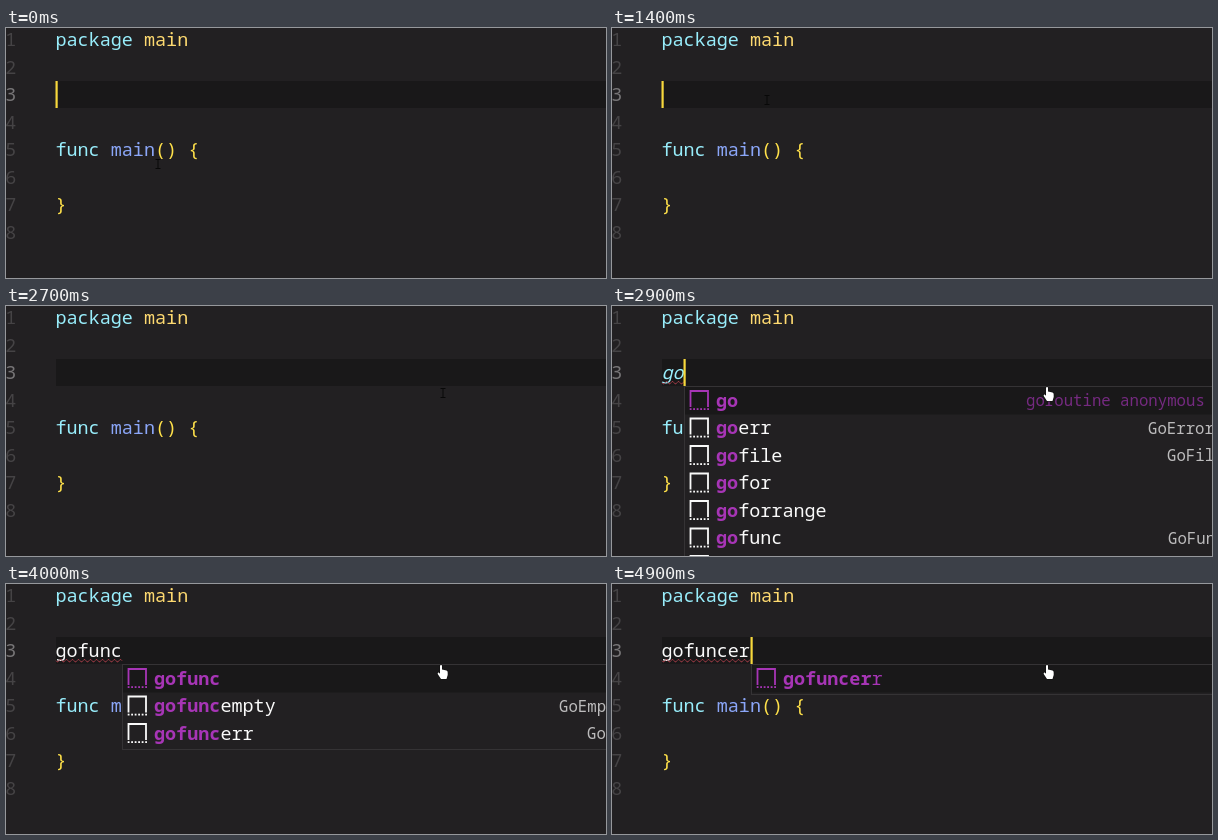
An HTML page with a canvas for the animation above (5000 ms loop, 600 by 250 pixels).

```html
<!DOCTYPE html>
<html lang="en">
<head>
<meta charset="utf-8">
<title>Snippet completion</title>
<style>
  html, body { margin: 0; width: 600px; height: 250px; overflow: hidden; background: #222022; }
  canvas { display: block; }
</style>
</head>
<body>
<canvas id="stage" width="600" height="250"></canvas>
<script>
const ctx = document.getElementById('stage').getContext('2d');
const LOOP = 5000, STEP = 100, BLINK = 525;
const CHAR = 11.07, LINE = 27.5, LEFT = 50, BASE = 18;
const FAMILY = '"Noto Sans Mono", "DejaVu Sans Mono", monospace';
const CYAN = '#98edfb', YELLOW = '#ffe14a', PURPLE = '#a735b6', WHITE = '#fafafa';

// label, detail, detail offset from the popup's left edge
const items = [
  ['go', 'goroutine anonymous function', 342],
  ['goerr', 'GoError', 464],
  ['gofile', 'GoFile', 483],
  ['gofor', '', 0],
  ['goforrange', '', 0],
  ['gofunc', 'GoFunc', 484],
  ['gofuncempty', 'GoEmptyFunc', 437],
  ['gofuncerr', 'GoFuncErr', 465]
];
const typed = 'gofuncer';
const keyTimes = [2800, 2900, 3000, 3100, 3200, 3400, 4300, 4700];

function text(str, x, y, color, style = '500', size = 18.45) {
  ctx.font = `${style} ${size}px ${FAMILY}`;
  ctx.fillStyle = color;
  ctx.fillText(str, x, y);
}

function rect(x, y, w, h, color) {
  ctx.fillStyle = color;
  ctx.fillRect(x, y, w, h);
}

const baseline = line => BASE + (line - 1) * LINE;
const caretX = count => Math.round(LEFT + count * CHAR);

function code(line, col, str, color, style) {
  text(str, LEFT - 0.6 + col * CHAR, baseline(line), color, style);
}

function drawEditor(word) {
  rect(0, 0, 600, 250, '#222022');
  rect(LEFT, 53, 550, 27, '#191819');
  for (let n = 1; n <= 8; n++) text(n, -0.8, baseline(n), n === 3 ? '#777577' : '#454345', '400');
  code(1, 0, 'package', CYAN);
  code(1, 8, 'main', '#fdd970');
  code(5, 0, 'func', CYAN);
  code(5, 5, 'main', '#8ba6f8');
  code(5, 9, '() {', YELLOW);
  code(7, 0, '}', YELLOW);
  if (word === 'go') code(3, 0, word, CYAN, 'italic 500');
  else code(3, 0, word, WHITE);
}

function drawSquiggle(width) {
  ctx.beginPath();
  for (let x = 0; x <= width; x++) ctx.lineTo(LEFT + x, 76.7 + 1.3 * Math.sin(x * Math.PI / 3));
  ctx.strokeStyle = '#a03c47';
  ctx.lineWidth = 1;
  ctx.stroke();
}

function drawIcon(x, y, color) {
  ctx.strokeStyle = color;
  ctx.lineWidth = 1.8;
  ctx.beginPath();
  ctx.moveTo(x, y + 16);
  ctx.lineTo(x, y);
  ctx.lineTo(x + 17.5, y);
  ctx.lineTo(x + 17.5, y + 16);
  ctx.stroke();
  for (let i = 0; i < 6; i++) rect(x - 0.8 + i * 3.5, y + 17.2, 1.8, 1.8, color);
}

function drawPopup(word) {
  const x = caretX(word.length);
  const rows = items.filter(([label]) => label.startsWith(word));
  const height = rows.length * 27.6 + 2.5;
  rect(x, 80, 600, height, '#222022');
  rect(x, 80, 600, LINE + 1, '#191819');
  ctx.strokeStyle = '#353335';
  ctx.lineWidth = 1;
  ctx.strokeRect(x + 0.5, 80.5, 600, Math.round(height));
  rows.forEach(([label, detail, offset], i) => {
    const y = baseline(4 + i), color = i ? WHITE : PURPLE;
    drawIcon(x + 6.5, y - 15.5, color);
    text(word, x + 32, y, PURPLE, 'bold');
    text(label.slice(word.length), x + 32 + word.length * CHAR, y, color);
    text(detail, x + offset, y - 0.5, i ? '#bcbbbc' : '#752a80', '400', 15.7);
  });
}

function drawBeam(x, y) {
  rect(x - 0.5, y - 4, 1, 9, '#080808');
  rect(x - 2.5, y - 5, 5, 1, '#080808');
  rect(x - 2.5, y + 4, 5, 1, '#080808');
}

function drawHand(x, y) {
  const hand = new Path2D('M-2.5-6.5q1.2-1 2 0V-2.5L4-1.5Q5.3-1 5.2.5V3L4 7H-1.5L-4.8 2Q-5 0-3.8.5L-2.5 1.8Z');
  ctx.save();
  ctx.translate(x, y);
  ctx.strokeStyle = '#111';
  ctx.lineWidth = 1.2;
  ctx.stroke(hand);
  ctx.fillStyle = '#fff';
  ctx.fill(hand);
  ctx.restore();
}

const progress = (t, from, to) => Math.min(1, Math.max(0, (t - from) / (to - from)));
const ease = p => p * p * (3 - 2 * p);

function pointer(t) {
  const up = ease(progress(t, 0, 600)), across = ease(progress(t, 1400, 2000));
  return [152 + 3 * up + 282 * across, 136 - 64 * up + 15 * across];
}

function draw(t) {
  const count = keyTimes.filter(k => k <= t).length;
  const word = typed.slice(0, count);
  const idle = Math.max(0, t - (count ? keyTimes[count - 1] : 50));
  const open = count > 1;
  drawEditor(word);
  if (open) {
    drawSquiggle(count * CHAR);
    drawPopup(word);
  }
  if (Math.floor(idle / BLINK) % 2 === 0) rect(caretX(count) - 0.5, 53, 2.2, 27, '#f7d83c');
  if (open) drawHand(436.5, 88);
  else drawBeam(...pointer(t));
}

const start = performance.now();
function frame() {
  const t = (performance.now() - start) % LOOP;
  draw(Math.floor(t / STEP) * STEP);
  requestAnimationFrame(frame);
}
frame();
</script>
</body>
</html>
```
